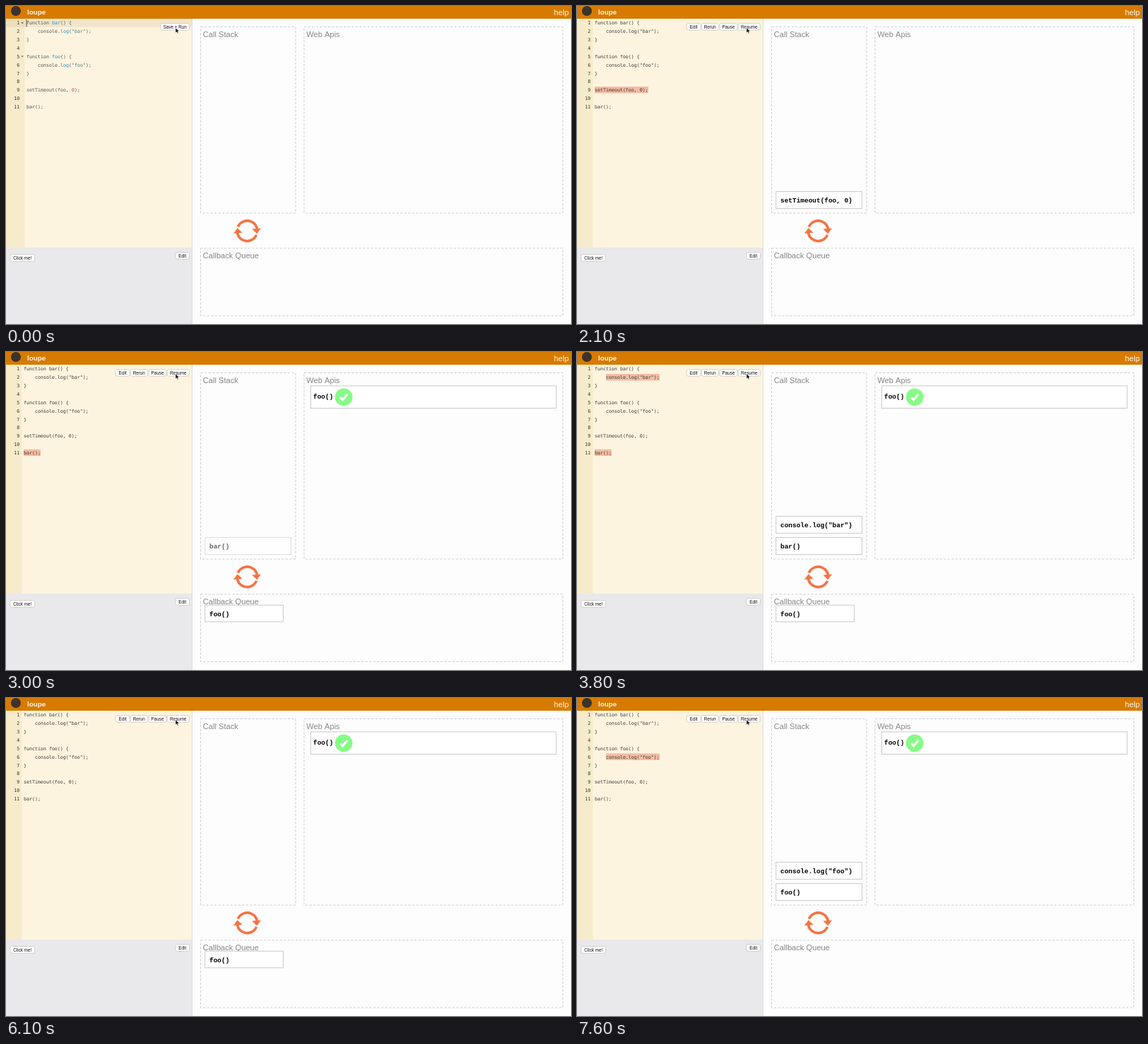
An HTML page with a canvas for the animation above (8000 ms loop, 800 px wide and 450 px high).

```html
<!DOCTYPE html>
<html lang="en">
<head>
<meta charset="utf-8">
<title>Event loop</title>
<style>
html, body { margin: 0; width: 100%; height: 100%; overflow: hidden; }
canvas { display: block; width: 800px; height: 450px; }
</style>
</head>
<body>
<canvas id="stage" width="800" height="450"></canvas>
<script>
const ctx = document.getElementById('stage').getContext('2d');

const LOOP = 8000, STEP = 100;
const RUN_AT = 1400;
const SANS = '"Liberation Sans", sans-serif';
const CODE_FONT = '6.64px "DejaVu Sans Mono", monospace';
const CALL_FONT = 'bold 9.45px "Liberation Mono", monospace';
const CHAR = 4, LINE = 11.85;

const CODE = [
  'function bar() {', '    console.log("bar");', '}', '',
  'function foo() {', '    console.log("foo");', '}', '',
  'setTimeout(foo, 0);', '', 'bar();'
];

// Calls on the stack: slot counts up from the bottom.
const CALLS = [
  { text: 'setTimeout(foo, 0)', slot: 0, from: 1500, to: 2200, line: 9 },
  { text: 'bar()', slot: 0, from: 3000, to: 5200, line: 11 },
  { text: 'console.log("bar")', slot: 1, from: 3700, to: 4400, line: 2 },
  { text: 'foo()', slot: 0, from: 6800, to: Infinity },
  { text: 'console.log("foo")', slot: 1, from: 7500, to: Infinity, line: 6 }
];
const TIMER_AT = 2200, SHIFT_AT = 6800;

const clamp = v => Math.max(0, Math.min(1, v));
const fade = (t, start) => clamp((t - start + 60) / 100);
const lineY = n => 24 + (n - 1) * LINE;

function rect(x, y, w, h, color) {
  ctx.fillStyle = color;
  ctx.fillRect(x, y, w, h);
}

function text(str, x, y, font, color, align = 'left') {
  ctx.font = font;
  ctx.fillStyle = color;
  ctx.textAlign = align;
  ctx.fillText(str, x, y);
}

function polygon(points, color) {
  ctx.beginPath();
  points.forEach(([x, y]) => ctx.lineTo(x, y));
  ctx.closePath();
  ctx.fillStyle = color;
  ctx.fill();
}

function disc(x, y, r, color) {
  ctx.beginPath();
  ctx.arc(x, y, r, 0, Math.PI * 2);
  ctx.fillStyle = color;
  ctx.fill();
}

function button(label, x, y, w) {
  ctx.beginPath();
  ctx.roundRect(x, y, w, 9.5, 2);
  ctx.fillStyle = '#fff';
  ctx.fill();
  ctx.lineWidth = 0.7;
  ctx.strokeStyle = '#c4c0bb';
  ctx.stroke();
  text(label, x + w / 2, y + 7, '6.3px ' + SANS, '#111', 'center');
}

function panel(label, x, y, w, h) {
  ctx.strokeStyle = '#cfcfcf';
  ctx.lineWidth = 1;
  ctx.setLineDash([3.4, 2.2]);
  ctx.strokeRect(x, y, w, h);
  ctx.setLineDash([]);
  text(label, x + 3.2, y + 14.5, '11.15px ' + SANS, '#878787');
}

function card(label, x, y, w, h, textX, textY, flash = 0) {
  rect(x, y, w, h, '#fff');
  if (flash > 0) rect(x, y, w, h, `rgba(252,242,192,${flash})`);
  ctx.strokeStyle = flash > 0 ? '#d5d1b8' : '#cacaca';
  ctx.lineWidth = 1;
  ctx.strokeRect(x, y, w, h);
  text(label, textX, textY, CALL_FONT, '#000');
}

function tokenColor(token) {
  if (token[0] === '"') return '#4b7d78';
  if (/\d/.test(token)) return '#d33682';
  return token.length > 1 ? '#268bd2' : '#4d5558';
}

function drawCode(t) {
  const running = t >= RUN_AT;
  const gutter = running ? 22.5 : 26.5;
  const left = running ? 25 : 29;
  rect(0, 18, 263, 324, '#fdf4df');
  rect(0, 18, gutter, 324, '#f6ebcb');
  if (!running) rect(0, 18, 263, 11.8, 'rgba(205,185,145,.25)');

  if (running) {
    for (const { line, from, to } of CALLS) {
      if (!line || t < from || t >= to) continue;
      const code = CODE[line - 1], body = code.trim();
      const indent = code.length - body.length;
      rect(left + indent * CHAR, lineY(line) - 4.8, body.length * CHAR, 9.4, '#f3bda3');
    }
  }

  CODE.forEach((code, i) => {
    const y = lineY(i + 1) + 2.4;
    text(i + 1, 19.2, y, CODE_FONT, '#333', 'right');
    if (running) return text(code, left, y, CODE_FONT, '#383838');
    for (const m of code.matchAll(/"\w+"|log|\b\w+(?=\(\) \{)|\d|./g))
      text(m[0], left + m.index * CHAR, y, CODE_FONT, tokenColor(m[0]));
  });

  if (!running) {
    for (const n of [1, 5]) {
      const y = lineY(n);
      polygon([[21.3, y - 1], [24.9, y - 1], [23.1, y + 1.2]], '#6b675c');
    }
    if (Math.floor(t / 500) % 2 === 0) rect(28.6, 19, 0.9, 10.5, '#333');
    button('Save + Run', 219, 24.7, 40.5);
  } else {
    button('Edit', 155.3, 24.7, 19.8);
    button('Rerun', 176.3, 24.7, 24);
    button('Pause', 202, 24.7, 25);
    button('Resume', 228.3, 24.7, 31);
  }
}

function drawSpinner(t) {
  const p = clamp((t - SHIFT_AT + 50) / 750);
  const turn = p * p * (3 - 2 * p) * Math.PI * 2;
  const color = '#f47443';
  ctx.save();
  ctx.translate(341.5, 318.2);
  ctx.rotate(turn);
  for (let half = 0; half < 2; half++) {
    ctx.beginPath();
    ctx.arc(0, 0, 14.3, Math.PI * 1.13, Math.PI * 1.95);
    ctx.lineWidth = 3.7;
    ctx.strokeStyle = color;
    ctx.stroke();
    polygon([[6.8, -2.6], [19.6, -3.8], [13.8, 4]], color);
    ctx.rotate(Math.PI);
  }
  ctx.restore();
}

function drawCheck(x, y) {
  disc(x, y, 12.4, '#86fb86');
  ctx.beginPath();
  ctx.moveTo(x - 5, y + 0.5);
  ctx.lineTo(x - 1.5, y + 4);
  ctx.lineTo(x + 5.3, y - 4);
  ctx.lineWidth = 3;
  ctx.strokeStyle = '#fff';
  ctx.stroke();
}

function drawPanels(t) {
  panel('Call Stack', 275.5, 29.5, 134.5, 263.5);
  panel('Web Apis', 422, 29.5, 366.5, 263.5);
  panel('Callback Queue', 275.5, 342.8, 513, 95.4);

  for (const { text: label, slot, from, to } of CALLS) {
    const alpha = fade(t, from) * (1 - fade(t, to));
    if (t < from || alpha <= 0) continue;
    const y = 262.6 - slot * 30.2;
    ctx.globalAlpha = alpha;
    card(label, 281.8, y, 121.7, 24, 288, y + 15.4);
    ctx.globalAlpha = 1;
  }

  if (t >= TIMER_AT) {
    card('foo()', 431.5, 47.9, 347.5, 31.6, 435, 66.4, clamp((2450 - t) / 300));
    drawCheck(478.2, 63.8);
  }
  if (t >= TIMER_AT && t < SHIFT_AT)
    card('foo()', 281.8, 358.2, 110.7, 23.6, 288, 373.6, clamp((2520 - t) / 300));

  drawSpinner(t);
}

function drawPointer(x, y) {
  const shape = [[0, 0], [0, 7.2], [1.7, 5.7], [2.9, 8.3], [4.2, 7.7], [3, 5.2], [5.2, 5.1]];
  polygon(shape.map(([dx, dy]) => [x + dx, y + dy]), '#000');
  ctx.lineWidth = 0.6;
  ctx.strokeStyle = '#fff';
  ctx.stroke();
}

function draw(t) {
  rect(0, 0, 800, 450, '#fefdfe');
  drawCode(t);
  rect(0, 342, 263, 108, '#e9e8ea');
  rect(263, 18, 1, 432, '#dedcdf');
  rect(0, 0, 800, 18, '#d77a00');
  disc(14, 7, 7, '#3b332c');
  text('loupe', 30, 12.4, 'bold 9.8px ' + SANS, '#fff6e8');
  text('help', 797, 13.4, '11.2px ' + SANS, '#fff6e8', 'right');
  button('Click me!', 6, 351.6, 34.6);
  button('Edit', 240, 348.7, 19.5);
  drawPanels(t);
  drawPointer(240, 30.8);
}

function frame(now) {
  const t = now % LOOP;
  draw(Math.floor(t / STEP) * STEP);
  requestAnimationFrame(frame);
}
requestAnimationFrame(frame);
</script>
</body>
</html>
```
